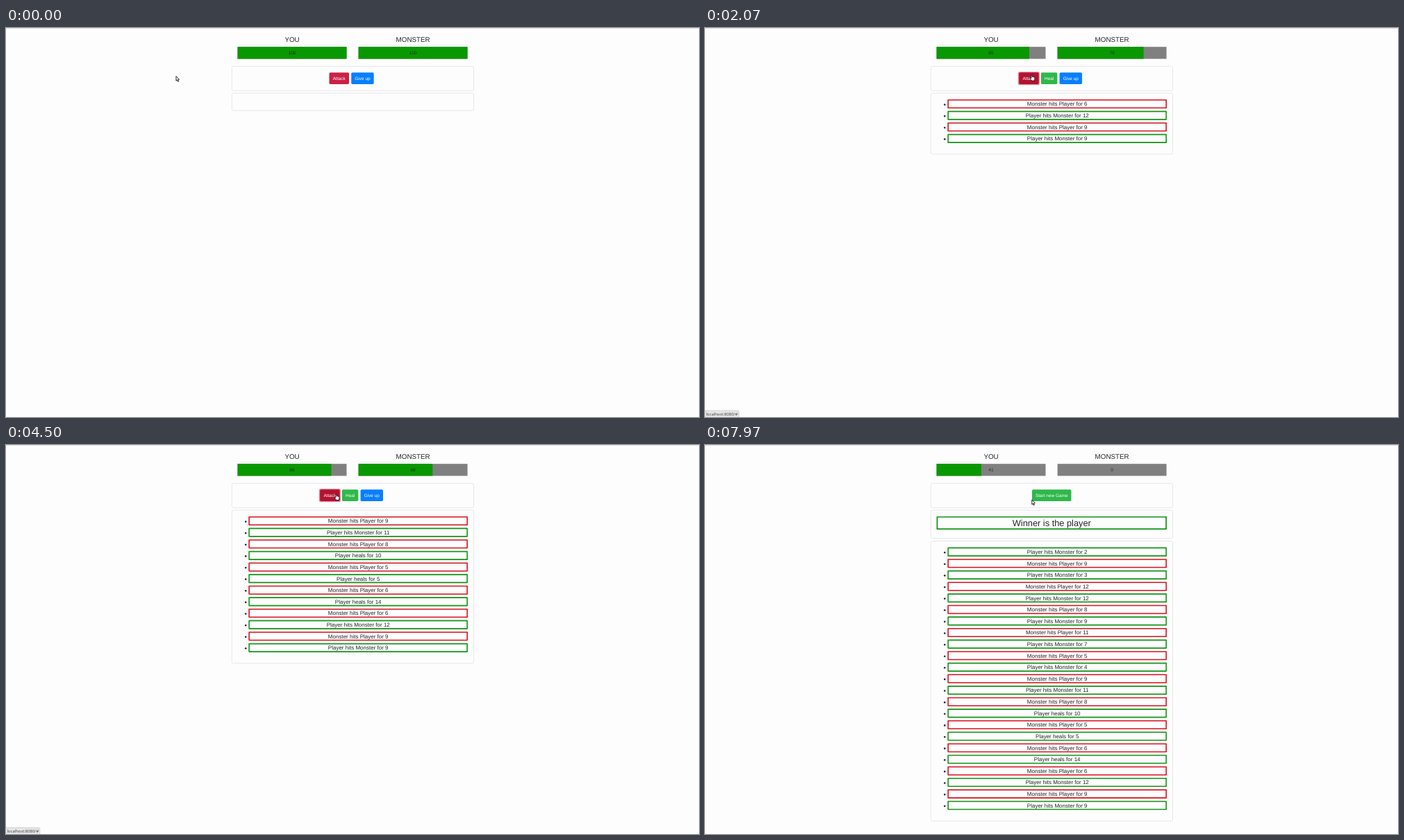
These frames come from a looping animation (998 px wide and 561 px high, 8 s). An HTML page with a canvas:

```html
<!DOCTYPE html>
<html lang="en">
<head>
<meta charset="utf-8">
<title>Monster battle</title>
<style>
  html, body { margin: 0; width: 100%; height: 100%; overflow: hidden; background: #fdfdfd; }
  canvas { display: block; width: 998px; height: 561px; }
</style>
</head>
<body>
<canvas id="stage"></canvas>
<script>
const W = 998, H = 561, LOOP = 8000;
const FONT = '"Liberation Sans", Arial, sans-serif';
const GREEN = '#129416', RED = '#d61222', INK = '#212529';
const canvas = document.getElementById('stage');
const ratio = window.devicePixelRatio || 1;
canvas.width = Math.round(W * ratio);
canvas.height = Math.round(H * ratio);
const ctx = canvas.getContext('2d');
ctx.scale(ratio, ratio);

// Each turn: time, action, logged amount, monster's hit, health of both afterwards.
const turns = [
  [1500, 'hit', 9, 9, 91, 91],
  [1950, 'hit', 12, 6, 85, 79],
  [2800, 'heal', 14, 6, 93, 79],
  [3150, 'heal', 5, 5, 93, 79],
  [3500, 'heal', 10, 8, 95, 79],
  [4250, 'hit', 11, 9, 86, 68],
  [4650, 'hit', 4, 5, 81, 64],
  [5060, 'hit', 7, 11, 70, 57],
  [5430, 'special', 9, 8, 62, 44],
  [5790, 'special', 12, 12, 50, 29],
  [6150, 'special', 3, 9, 41, 15],
  [6850, 'special', 2, 0, 41, 0]
].map(([at, action, amount, taken, you, monster]) => ({ at, action, amount, taken, you, monster }));

// Pointer keys: time, x, y of the tip.
const path = [
  [0, 245, 69.5], [150, 245, 69.5], [880, 470.5, 67.5], [2130, 470.5, 67.5],
  [2480, 496, 68.8], [3570, 496, 68.8], [3800, 473.5, 72.5], [4250, 473.5, 72.5],
  [4650, 476.5, 70], [5200, 476.5, 70], [5700, 475.2, 70], [7560, 475.2, 70],
  [7820, 470.8, 79]
];

const kinds = {
  attack:  { label: 'Attack', w: 28.5, base: [203, 33, 68], dark: [179, 18, 47], ink: '#fff' },
  special: { label: 'Special Attack', w: 51, base: [249, 196, 18], dark: [230, 181, 16], ink: INK },
  heal:    { label: 'Heal', w: 23.5, base: [47, 184, 74], dark: [41, 155, 61], ink: '#fff' },
  give:    { label: 'Give up', w: 32.5, base: [8, 127, 255], dark: [4, 105, 217], ink: '#fff' },
  start:   { label: 'Start new Game', w: 56.5, base: [47, 184, 74], dark: [41, 155, 61], ink: '#fff' }
};
const BTN_Y = 64.3, BTN_H = 16.6, GAP = 3.2;

const ease = u => u * u * (3 - 2 * u);

function pointerAt(t) {
  const i = path.findIndex(k => k[0] > t);
  if (i < 0) return path[path.length - 1].slice(1);
  const [t0, x0, y0] = path[Math.max(0, i - 1)];
  const [t1, x1, y1] = path[i];
  const u = ease((t - t0) / (t1 - t0));
  return [x0 + (x1 - x0) * u, y0 + (y1 - y0) * u];
}

function stateAt(t) {
  const done = turns.filter(turn => turn.at <= t);
  const last = done[done.length - 1] || { you: 100, monster: 100 };
  const won = last.monster === 0;
  const names = won ? ['start'] : ['attack'];
  if (!won) {
    if (last.monster < 60) names.push('special');
    if (last.you < 100) names.push('heal');
    names.push('give');
  }
  const total = names.reduce((sum, n) => sum + kinds[n].w + GAP, -GAP);
  let x = (won ? 499.2 : 497.6) - total / 2;
  const [px, py] = pointerAt(t);
  const buttons = names.map(name => {
    const b = { name, x, w: kinds[name].w };
    b.hover = px >= x && px <= x + b.w && py >= BTN_Y && py <= BTN_Y + BTN_H;
    b.focus = !won && done.length > 0 && name === (last.action === 'heal' ? 'heal' : 'attack');
    x += b.w + GAP;
    return b;
  });
  return { done, last, won, buttons, px, py, hovering: buttons.some(b => b.hover) };
}

// Share of the last 150 ms in which the button was hovered or focused.
function darkness(name, t) {
  const steps = 8;
  let n = 0;
  for (let i = 0; i < steps; i++) {
    const b = stateAt(t - i * 150 / steps).buttons.find(o => o.name === name);
    if (b && (b.hover || b.focus)) n++;
  }
  return n / steps;
}

function text(str, x, y, size, color = INK, align = 'center', family = FONT) {
  ctx.font = `${size}px ${family}`;
  ctx.textAlign = align;
  ctx.fillStyle = color;
  ctx.fillText(str, x, y + size * 0.355);
}

function rect(x, y, w, h, color) {
  ctx.fillStyle = color;
  ctx.fillRect(x, y, w, h);
}

function rounded(x, y, w, h, r) {
  ctx.beginPath();
  ctx.roundRect(x, y, w, h, r);
}

function frame(x, y, w, h, color, line) {
  ctx.strokeStyle = color;
  ctx.lineWidth = line;
  ctx.strokeRect(x + line / 2, y + line / 2, w - line, h - line);
}

function card(top, bottom) {
  rounded(325.3, top, 348.2, bottom - top, 2);
  ctx.strokeStyle = '#e5e5ec';
  ctx.lineWidth = 0.9;
  ctx.stroke();
}

function health(title, x, value) {
  text(title, x + 78.5, 17, 9.8);
  rect(x, 27.2, 157, 17.3, '#808080');
  rect(x, 27.2, 157 * value / 100, 17.3, '#099802');
  text(value, x + 78.5, 36, 6.6, '#26302a');
}

function button({ name, x, w, focus }, t) {
  const { label, base, dark, ink } = kinds[name];
  const d = darkness(name, t);
  const rgb = base.map((c, i) => Math.round(c + (dark[i] - c) * d)).join();
  if (focus) {
    rounded(x - 1.4, BTN_Y - 1.4, w + 2.8, BTN_H + 2.8, 2.6);
    ctx.fillStyle = `rgba(${base.join()},0.5)`;
    ctx.fill();
  }
  rounded(x, BTN_Y, w, BTN_H, 1.6);
  ctx.fillStyle = `rgb(${rgb})`;
  ctx.fill();
  text(label, x + w / 2, 72.5, 6.45, ink);
}

function logRow(str, color, y) {
  ctx.beginPath();
  ctx.arc(345.2, y + 0.9, 1.3, 0, Math.PI * 2);
  ctx.fillStyle = INK;
  ctx.fill();
  frame(349.3, y - 6.6, 315.7, 13.1, color, 1.6);
  text(str, 507.2, y, 8);
}

function log(done, shift) {
  const rows = [];
  for (const { action, amount, taken } of done) {
    rows.unshift([action === 'heal' ? `Player heals for ${amount}` : `Player hits Monster for ${amount}`, GREEN]);
    if (taken) rows.unshift([`Monster hits Player for ${taken}`, RED]);
  }
  card(94 + shift, shift + (rows.length ? 115.4 + 16.62 * rows.length : 119));
  rows.forEach(([str, color], i) => logRow(str, color, 109.6 + shift + 16.62 * i));
}

function outline(points, x, y) {
  ctx.beginPath();
  for (const [dx, dy] of points) ctx.lineTo(x + dx, y + dy);
  ctx.closePath();
  ctx.lineJoin = 'round';
  ctx.lineWidth = 0.9;
  ctx.strokeStyle = '#111';
  ctx.fillStyle = '#fff';
  ctx.fill();
  ctx.stroke();
}

const arrow = [[0, 0], [0, 6.7], [1.5, 5.4], [2.5, 7.9], [3.6, 7.4], [2.6, 5], [4.5, 4.8]];
const hand = [[-0.6, 0.2], [0.6, 0.2], [0.8, 3], [2.2, 3], [3.4, 3.4], [4.4, 4],
  [4.4, 6], [3.6, 8.6], [0, 8.6], [-1.2, 6.8], [-2.4, 5], [-1.8, 4.3], [-0.7, 5.2]];

function statusBar() {
  rounded(-3, 551.8, 51.8, 12, 1.5);
  ctx.fillStyle = '#e6e6e6';
  ctx.fill();
  ctx.strokeStyle = '#c4c4c4';
  ctx.lineWidth = 0.7;
  ctx.stroke();
  text('localhost:8080/#', 1.6, 557, 5.85, '#444', 'left', '"Noto Sans", sans-serif');
}

function draw(t) {
  const s = stateAt(t);
  rect(0, 0, W, H, '#fdfdfd');
  rect(0, 0, W, 0.9, '#dcdcdc');
  health('YOU', 333.5, s.last.you);
  health('MONSTER', 507.6, s.last.monster);
  card(55.3, 90.3);
  s.buttons.forEach(b => button(b, t));
  if (s.won) {
    card(94, 134.5);
    frame(333.5, 102.9, 331.5, 19.1, GREEN, 1.7);
    text('Winner is the player', 499.3, 112.8, 12.8);
  }
  log(s.done, s.won ? 44.6 : 0);
  if (s.hovering) statusBar();
  outline(s.hovering ? hand : arrow, s.px, s.py);
}

ctx.textBaseline = 'alphabetic';
ctx.textRendering = 'geometricPrecision';

function tick() {
  draw(performance.now() % LOOP);
  requestAnimationFrame(tick);
}
tick();
</script>
</body>
</html>
```
